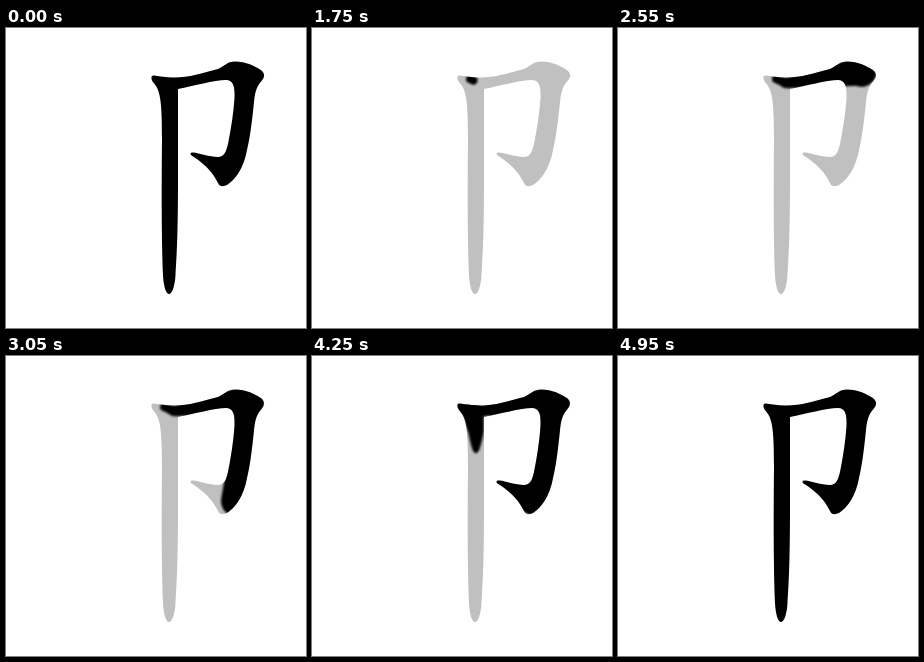
An HTML page with a canvas that plays this animation: 300 px wide and 300 px high, repeating every 5.95 s.

```html
<!DOCTYPE html>
<html lang="en">
<head>
<meta charset="utf-8">
<title>Stroke order</title>
<style>
  html, body { margin: 0; width: 100%; height: 100%; overflow: hidden; background: #fff; }
  canvas { display: block; }
</style>
</head>
<body>
<canvas id="stage" width="300" height="300"></canvas>
<script>
const ctx = document.getElementById('stage').getContext('2d');
const LOOP = 5950, GUIDE_START = 1000, DONE = 4950;

const glyph = new Path2D(`M145.5 49 C146 46 151 48 155 48.5 C177 52 192 46 212 41
  C219 38 221 33.5 229 33.5 C240 33.5 249 38 255.5 42.5 C259 46 259 49 255.5 53
  C249.5 60 249 66 248 74 C246 94 244 110 241 122 C238 140 229 152 221 157
  C217 159 213.5 158.5 212 155 C207 145 201 138 188 129 C184 127 183 124.5 187 124.5
  C194 125 203 129 212 129 C218 129 220 124 222 116 C225 101 227.5 85 228.5 70
  C229 58 227 52 220 52 C208 52 188 58 172 61 V150 C172 200 171 225 169.5 247
  C169 258 166 266 163 266 S157.5 258 157 247 C155.5 210 155.5 160 156 110
  C156 80 155 66 150 58 C147 54 145 52 145.5 49Z`);

// The brush swells from `thin` to `thick` by `grow` per pixel; `pauses` are steps held back 50 ms.
const strokes = [
  {
    start: 1750, steps: 15, pauses: [2, 7, 13],
    reach: 248, ease: 1.48, thin: 4, grow: 0.12, thick: 15, taper: 4.8,
    spine: [[158, 51], [168, 55], [185, 52.5], [244, 43], [237, 105], [229.5, 148], [187, 127]]
  },
  {
    start: 3800, steps: 12, pauses: [4],
    reach: 249, ease: 1.7, thin: 5, grow: 0.35, thick: 13, taper: 1.7,
    spine: [[147, 48.5], [161, 57], [164, 75], [163, 266]]
  }
];

function stepAt({ start, steps, pauses }, time) {
  let step = 0;
  while (step < steps &&
         time >= start + 100 * step + 50 * pauses.filter(p => p <= step).length) step++;
  return step;
}

// Row of discs along the spine, narrowing towards the brush tip.
function brushPath({ spine, thin, grow, thick, taper }, tip) {
  const path = new Path2D();
  let travelled = 0;
  for (let i = 1; i < spine.length; i++) {
    const [x0, y0] = spine[i - 1], [x1, y1] = spine[i];
    const length = Math.hypot(x1 - x0, y1 - y0);
    for (let d = 0; d < length; d += 0.5) {
      const along = travelled + d;
      if (along >= tip) return path;
      const x = x0 + (x1 - x0) * d / length, y = y0 + (y1 - y0) * d / length;
      const r = Math.min(thin + grow * along, thick, taper * Math.sqrt(tip - along));
      path.moveTo(x + r, y);
      path.arc(x, y, r, 0, 2 * Math.PI);
    }
    travelled += length;
  }
  return path;
}

function draw(time) {
  const whole = time < GUIDE_START || time >= DONE;
  ctx.clearRect(0, 0, 300, 300);
  ctx.fillStyle = whole ? '#000' : '#c0c0c0';
  ctx.fill(glyph);
  if (whole) return;
  ctx.save();
  ctx.clip(glyph);
  ctx.filter = 'blur(1.3px)';
  ctx.fillStyle = '#000';
  for (const stroke of strokes) {
    const progress = stepAt(stroke, time) / stroke.steps;
    ctx.fill(brushPath(stroke, stroke.reach * progress ** stroke.ease));
  }
  ctx.restore();
}

const origin = performance.now();
function tick() {
  draw((performance.now() - origin) % LOOP);
  requestAnimationFrame(tick);
}
tick();
</script>
</body>
</html>
```
